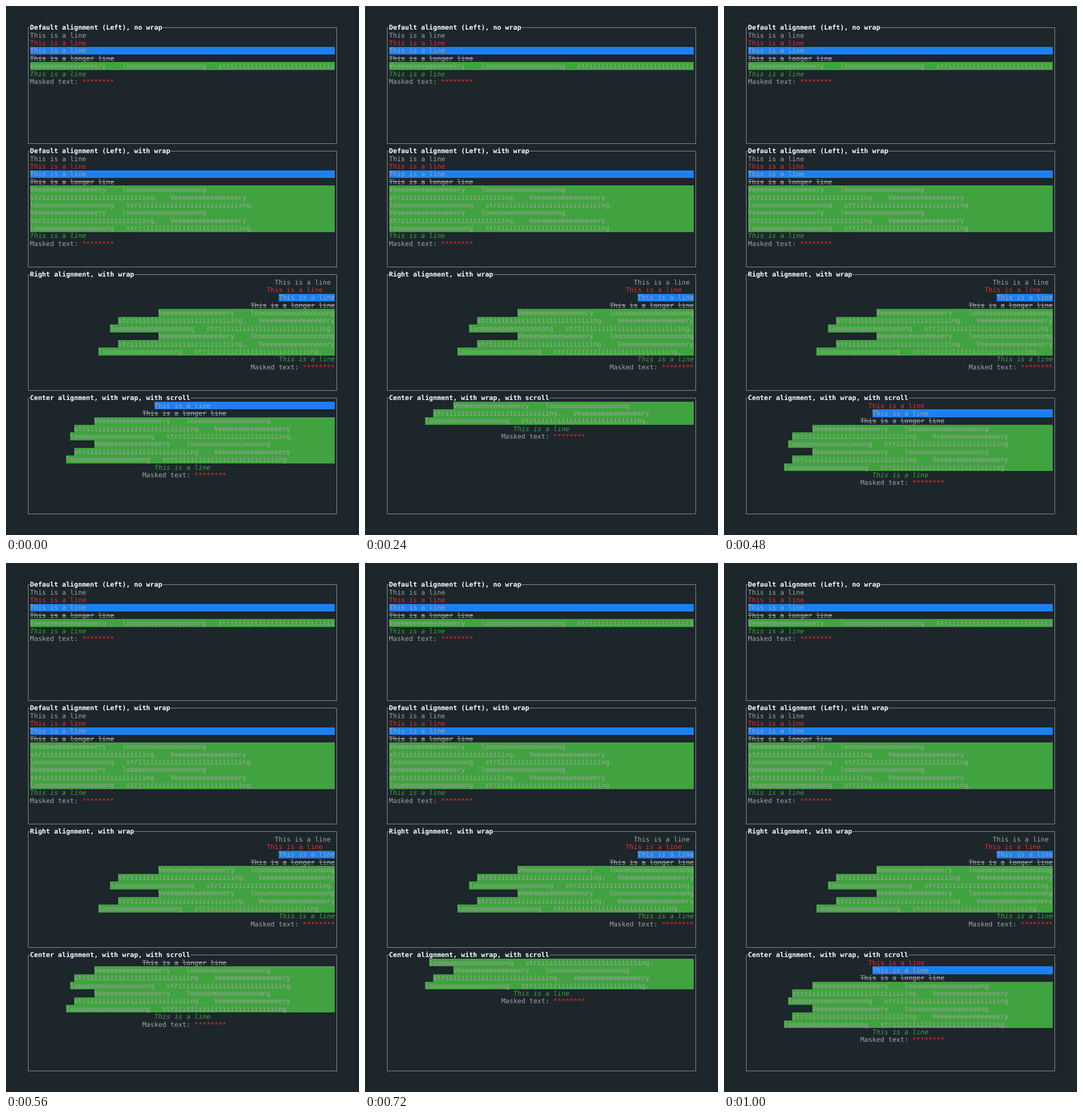
Write an HTML page that moves like this. It is 611 by 917 pixels and loops after 1040 ms.

```html
<!DOCTYPE html>
<html lang="en">
<head>
<meta charset="utf-8">
<title>Paragraph alignment</title>
<style>
  html, body { margin: 0; width: 100%; height: 100%; overflow: hidden; background: #1c262b; }
  svg { display: block; width: 611px; height: 917px; }
  text {
    font: 11.53px "DejaVu Sans Mono", monospace;
    text-rendering: geometricPrecision;
    white-space: pre;
    fill: #a4a4a4;
  }
  rect { shape-rendering: crispEdges; }
  .title { font-weight: bold; fill: #fff; }
  .red { fill: #ee2b2a; }
  .blue { fill: #1e80f0; }
  .green { fill: #40a33f; }
  .italic { font-style: italic; fill: #40a33f; }
  .border { fill: none; stroke: #878b8c; }
  .strike { stroke: #a4a4a4; }
</style>
</head>
<body>
<svg id="stage" viewBox="0 0 611 917"></svg>
<script>
const CELL_W = 6.943, CELL_H = 13.373, LEFT = 34.6, TOP = 30.6, ASCENT = 10.7;
const COLS = 76, PANEL_ROWS = 16;
const TICK = 40, LOOP = 1040;

const stage = document.getElementById('stage');
const colX = col => LEFT + col * CELL_W;
const rowY = row => TOP + row * CELL_H;

function add(parent, tag, attrs, content) {
  const node = document.createElementNS('http://www.w3.org/2000/svg', tag);
  for (const key in attrs) node.setAttribute(key, attrs[key]);
  if (content) node.textContent = content;
  parent.append(node);
  return node;
}

const very = 'V' + 'e'.repeat(16) + 'ry';
const long = 'l' + 'o'.repeat(18) + 'ng';
const string = 'str' + 'i'.repeat(26) + 'ng.';
const wrapped = [
  `${very}    ${long}`,
  `${string}   ${very}`,
  `${long}   ${string}`
];

const green = text => ({ text, bg: 'green' });
const head = [
  { text: 'This is a line ' },
  { text: 'This is a line   ', cls: 'red' },
  { text: 'This is a line', bg: 'blue' },
  { text: 'This is a longer line', strike: true }
];
const tail = [
  { text: 'This is a line', cls: 'italic' },
  { text: 'Masked text: ', mask: '********' }
];
const unwrappedLines = [...head, green(`${very}    ${long}   ${string}`.slice(0, COLS)), ...tail];
const wrappedLines = [
  ...head,
  ...wrapped.map(green),
  ...wrapped.slice(0, 2).map(green),
  green(wrapped[2] + '   '),
  ...tail
];

const align = {
  left: () => 0,
  right: width => COLS - width,
  center: width => COLS / 2 - Math.floor(width / 2)
};

function drawLine(parent, line, row, side) {
  const { text, cls = '', bg, strike, mask = '' } = line;
  const col = 1 + align[side](text.length + mask.length);
  const x = colX(col), y = rowY(row);
  const g = add(parent, 'g', {});
  if (bg) add(g, 'rect', { x, y, width: colX(COLS + 1) - x, height: CELL_H, class: bg });
  const label = add(g, 'text', { x, y: y + ASCENT, class: cls }, text);
  if (mask) add(label, 'tspan', { class: 'red' }, mask);
  if (strike) {
    const mid = Math.floor(y + CELL_H / 2) + 0.5;
    for (const word of text.matchAll(/\S+/g)) {
      const start = col + word.index;
      add(g, 'path', { class: 'strike', d: `M${colX(start)} ${mid}H${colX(start + word[0].length)}` });
    }
  }
  return g;
}

function drawPanel(index, title, lines, side) {
  const row = index * PANEL_ROWS;
  const snap = v => Math.floor(v + 0.25) + 0.5;
  const x1 = snap(colX(0.5)), x2 = snap(colX(COLS + 1.5));
  const y1 = snap(rowY(row + 0.5)), y2 = snap(rowY(row + PANEL_ROWS - 0.5));
  add(stage, 'path', {
    class: 'border',
    d: `M${colX(1)} ${y1}H${x1}V${y2}H${x2}V${y1}H${colX(1 + title.length)}`
  });
  add(stage, 'text', { x: colX(1), y: rowY(row) + ASCENT, class: 'title' }, title);
  const body = add(stage, 'g', {});
  lines.forEach((line, i) => drawLine(body, line, row + 1 + i, side));
  return body;
}

drawPanel(0, 'Default alignment (Left), no wrap', unwrappedLines, 'left');
drawPanel(1, 'Default alignment (Left), with wrap', wrappedLines, 'left');
drawPanel(2, 'Right alignment, with wrap', wrappedLines, 'right');
const scroller = drawPanel(3, 'Center alignment, with wrap, with scroll', wrappedLines, 'center');

// The offset advances one row per tick, pausing on every fourth tick.
function scrollAt(time) {
  const tick = Math.floor((time % LOOP) / TICK);
  return (2 + tick - Math.floor((tick + 1) / 4)) % 10;
}

let shown = -1;
function render() {
  const offset = scrollAt(performance.now());
  if (offset !== shown) {
    shown = offset;
    scroller.setAttribute('transform', `translate(0 ${-offset * CELL_H})`);
    [...scroller.children].forEach((line, i) => {
      line.style.display = i < offset ? 'none' : '';
    });
  }
  requestAnimationFrame(render);
}
render();
</script>
</body>
</html>
```
